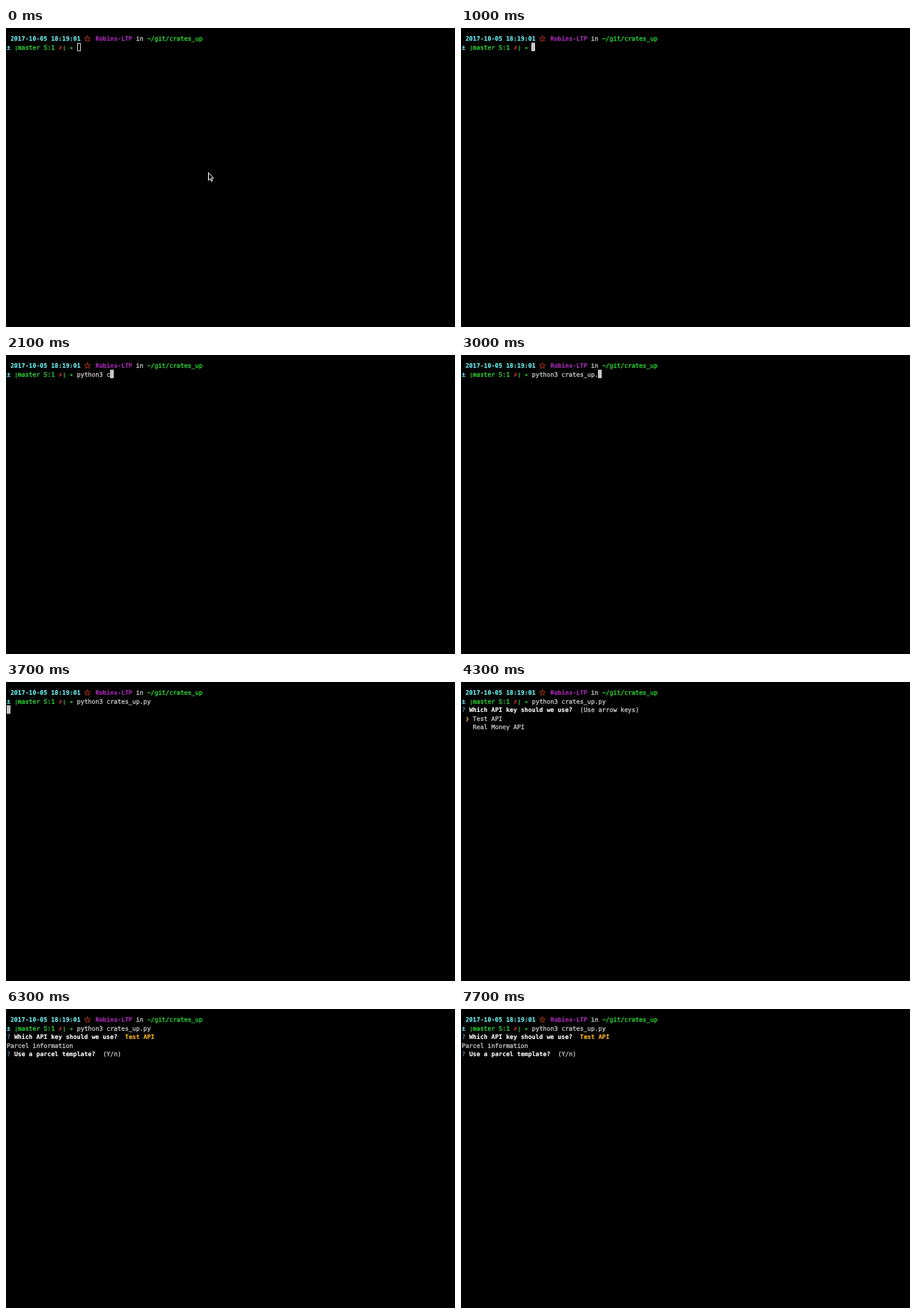
These frames come from a looping animation (600x400 px, 8 s). An HTML page:

```html
<!DOCTYPE html>
<html lang="en">
<head>
<meta charset="utf-8">
<style>
  html, body { margin: 0; width: 100%; height: 100%; overflow: hidden; background: #000; }
  svg { display: block; }
  text {
    font-family: "DejaVu Sans Mono", "DejaVu Sans", monospace;
    font-size: 8.2px;
    white-space: pre;
    text-rendering: geometricPrecision;
  }
</style>
</head>
<body>
<svg id="stage" width="600" height="400" viewBox="0 0 600 400"></svg>
<script>
const LOOP = 8000, CELL = 4.938, LINE = 11.5;
const GREY = '#c7c7c7', WHITE = '#fff', GREEN = '#2fdc36', CYAN = '#6ff5f7',
      RED = '#d03a22', PURPLE = '#ae2cba', BLUE = '#5f819d', AMBER = '#ffb820';
const PROJECT = 'crates_up';
const FOCUS = 500, FIRST_KEY = 1000, ENTER = 3700, MENU = 4100, ANSWER = 5300, PARCEL = 6100;
const PROMPT_COL = 19;

const stage = document.getElementById('stage');
const timed = [];
const colX = col => 1 + col * CELL;

function add(tag, attrs, from = 0, to = LOOP) {
  const node = document.createElementNS('http://www.w3.org/2000/svg', tag);
  for (const name in attrs) node.setAttribute(name, attrs[name]);
  stage.append(node);
  timed.push({ node, from, to });
  return node;
}

// A thin stroke gives the regular weight its heavier terminal look
function write(text, col, row, fill, { bold = false, size = 8.2, from, to } = {}) {
  const node = add('text', {
    x: colX(col), y: 17 + row * LINE, fill, stroke: fill, 'stroke-width': bold ? 0.1 : 0.3,
    style: `font-size:${size}px;font-weight:${bold ? 700 : 400}`
  }, from, to);
  node.textContent = text;
  return node;
}

function star(x, y, radius, stroke) {
  const points = Array.from({ length: 10 }, (_, i) => {
    const r = i % 2 ? radius * 0.4 : radius, angle = (i / 5 - 0.5) * Math.PI;
    return [x + r * Math.cos(angle), y + r * Math.sin(angle)];
  });
  add('polygon', { points: points.join(' '), fill: 'none', stroke, 'stroke-width': 0.8 });
}

// Shell prompt
write('2017-10-05 18:19:01', 1, 0, CYAN, { bold: true });
star(108.8, 14.4, 4.2, RED);
write('Robins-LTP', 24, 0, PURPLE, { bold: true });
write('in', 35, 0, GREY);
write('~/git/' + PROJECT, 38, 0, GREEN);
write('±', 0, 1, CYAN, { bold: true });
write('|', 2.2, 1, GREEN, { size: 6.6 });
write('master S:1', 3, 1, GREEN);
write('✗', 14, 1, RED);
write('|', 15.2, 1, GREEN, { size: 6.6 });
write('➜', 17, 1, GREEN, { size: 6.6 });
const command = write('', PROMPT_COL, 1, GREY);

// Key choice
write('?', 0, 2, BLUE, { from: MENU });
write('Which API key should we use?', 2, 2, WHITE, { bold: true, from: MENU });
const choosing = { from: MENU, to: ANSWER };
write('(Use arrow keys)', 32, 2, GREY, choosing);
write('❯', 1, 3, AMBER, { bold: true, ...choosing });
write('Test API', 3, 3, GREY, choosing);
write('Real Money API', 3, 4, GREY, choosing);
write('Test API', 32, 2, AMBER, { bold: true, from: ANSWER });

// Parcel question
write('Parcel information', 0, 3, GREY, { from: PARCEL });
write('?', 0, 4, BLUE, { from: PARCEL });
write('Use a parcel template?', 2, 4, WHITE, { bold: true, from: PARCEL });
write('(Y/n)', 26, 4, GREY, { from: PARCEL });

// Text cursor: outlined until the window gets focus
add('rect', { x: 95.5, y: 20.5, width: 4, height: 10, fill: 'none', stroke: GREY }, 0, FOCUS);
const block = add('rect', { width: 5, height: 11.3, fill: GREY }, FOCUS);

// Mouse pointer: arrow, then I-beam
add('path', {
  d: 'M270.5 193.5v10.2l2.3-2.2 1.6 3.6 1.6-.7-1.6-3.5h3z',
  fill: '#000', stroke: WHITE, 'stroke-width': 1
}, 0, FOCUS);
add('path', {
  d: 'M267.5 187.5q2.5 0 2.5 2v8q0 2-2.5 2M272.5 187.5q-2.5 0-2.5 2v8q0 2 2.5 2',
  fill: 'none', stroke: GREY, 'stroke-width': 1
}, FOCUS, FIRST_KEY);

// Typed one key at a time; the file name is completed in one go
const full = `python3 ${PROJECT}.py`;
const keys = [[1200, 1], [1400, 2], [1500, 3], [1600, 4], [1700, 5], [1800, 6], [1900, 7],
              [2000, 8], [2100, 9], [2300, 18], [3400, 19], [3500, 20]];

function render(t) {
  for (const { node, from, to } of timed)
    node.style.display = t >= from && t < to ? '' : 'none';

  const typed = keys.reduce((count, [at, length]) => t >= at ? length : count, 0);
  command.textContent = full.slice(0, typed);

  let col = PROMPT_COL + typed, row = 1;
  if (t >= ENTER) { col = 0; row = t < ANSWER ? 2 : 3; }
  block.setAttribute('x', Math.floor(colX(col)));
  block.setAttribute('y', 8.2 + row * LINE);
  if ((t >= MENU && t < ANSWER) || t >= PARCEL) block.style.display = 'none';
}

const start = performance.now();
function tick() {
  render((performance.now() - start) % LOOP);
  requestAnimationFrame(tick);
}
tick();
</script>
</body>
</html>
```
